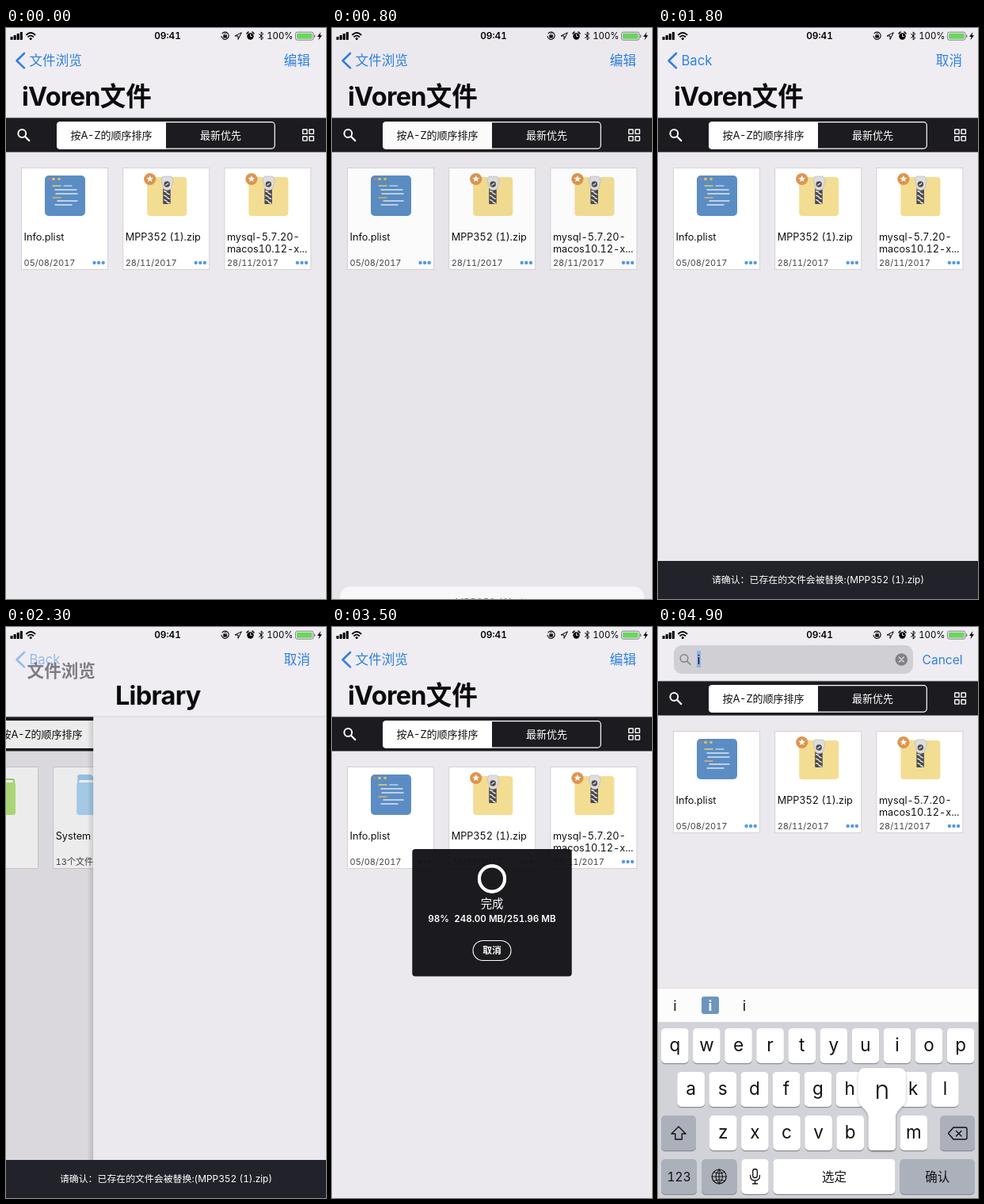
Write an HTML page that moves like this. It is 404x720 px and loops after 5000 ms.

```html
<!DOCTYPE html>
<html lang="zh">
<head>
<meta charset="utf-8">
<style>
html, body { margin: 0; width: 100%; height: 100%; overflow: hidden; background: #ebe9ee; }
svg { display: block; width: 404px; height: 720px; }
text { font-family: Inter, 'Noto Sans CJK SC', 'Noto Sans CJK', sans-serif; font-variant-numeric: tabular-nums; white-space: pre; }
</style>
</head>
<body>
<svg id="stage" viewBox="0 0 404 720"></svg>
<script>
const LOOP = 5000;
const INK = '#1c1b20', BLUE = '#2f80df', PAGE = '#ebe9ee', NAV = '#efedf2';
const $ = id => document.getElementById(id);

const rect = (x, y, w, h, fill, r = 0, more = '') =>
  `<rect x="${x}" y="${y}" width="${w}" height="${h}" rx="${r}" fill="${fill}" ${more}/>`;
const circle = (x, y, r, fill, more = '') => `<circle cx="${x}" cy="${y}" r="${r}" fill="${fill}" ${more}/>`;
const path = (d, fill, more = '') => `<path d="${d}" fill="${fill}" ${more}/>`;
const line = (d, color, width, more = '') =>
  path(d, 'none', `stroke="${color}" stroke-width="${width}" stroke-linecap="round" stroke-linejoin="round" ${more}`);
const text = (x, y, size, s, fill = '#111', more = '') =>
  `<text x="${x}" y="${y}" font-size="${size}" fill="${fill}" ${more}>${s}</text>`;
const MID = 'text-anchor="middle"', END = 'text-anchor="end"';
const group = (id, inner, more = '') => `<g id="${id}" ${more}>${inner}</g>`;

// Icons are drawn in a 51 by 51 box
function codeIcon() {
  const rows = [[10, 13, 20, '#e6cf6a'], [24, 13, 34, '#b9d3ee'], [13, 18, 40, '#dbe7f5'], [14, 23, 41, '#dbe7f5'],
    [10, 28, 20, '#e0b36c'], [16, 32, 41, '#dbe7f5'], [13, 37, 34, '#dbe7f5']];
  return rect(0, 0, 51, 51, '#5b8dc4', 5) +
    circle(5, 4.5, 1.5, '#d9775b') + circle(11, 4.5, 1.8, '#ecc84d') + circle(18, 4.5, 1.8, '#d5c65b') +
    rows.map(([x, y, x2, c]) => line(`M${x} ${y}H${x2}`, c, 1.5)).join('');
}

function zipIcon() {
  const star = Array.from({ length: 10 }, (_, i) => {
    const a = i * Math.PI / 5 - Math.PI / 2, r = i % 2 ? 2 : 4.6;
    return `${(4.5 + r * Math.cos(a)).toFixed(1)},${(4.3 + r * Math.sin(a)).toFixed(1)}`;
  });
  let teeth = '';
  for (let i = 0; i < 6; i++) teeth += line(`M${i % 2 ? 26 : 22.5} ${19.5 + i * 2.8}l3 1.5`, '#ebe9e2', 1.5);
  return rect(1, 2, 50, 49, '#f3dd92', 4) +
    rect(21, 16, 9.5, 20, '#4a4a4f', 1) + teeth +
    path('M21 1h10l3 5-3 11q-5 3-9 0l-3-11z', '#dddddf', 'stroke="#bcbabc" stroke-width=".7"') +
    circle(26, 11, 3.7, '#4c4c50') + line('M24.5 12l3-2', '#e8e8e8', 1.3) +
    circle(4.5, 4.5, 7.6, '#dc954f') + `<polygon points="${star.join(' ')}" fill="#fff"/>`;
}

function folderIcon(front, back, extra = '') {
  return path('M1 12V3q0-3 3-3h13q2 0 3 2l2 3h25q3 0 3 3v8H1z', back) +
    rect(3, 7, 45, 8, '#fff', 1) +
    path('M0 13q0-3 3-3h45q3 0 3 3v35q0 3-3 3H3q-3 0-3-3z', front) + extra;
}
const blueFolder = () => folderIcon('#b1d9f8', '#9fcdf0');
const greenFolder = () => folderIcon('#b7e67f', '#a3d86a',
  line('M20 21l2-4h8l2 4v18l-2 4h-8l-2-4zM21 21h10M21 39h10', '#79b144', 1.8) + path('M27 23l-5 8h3.5l-1 7 5-9h-3.5z', '#79b144'));

function card(i, icon, name, info, dots = true) {
  const x = 19.5 + 128.2 * (i % 3), y = 176.5 + 148.5 * Math.floor(i / 3);
  const lines = name.split('\n');
  return `<g transform="translate(${x} ${y})">` +
    rect(0, 0, 109, 128, '#fff', 0, 'stroke="#d3d2d8"') +
    `<g transform="translate(29.5 9.5)">${icon}</g>` +
    lines.map((s, k) => text(3, 91 + k * 15, 12.7, s)).join('') +
    text(3, 123, 11, info, '#444') +
    (dots ? [92, 97.6, 103.2].map(d => circle(d, 119.5, 2.2, '#559be6')).join('') : '') + '</g>';
}

const toolbar = rect(0, 113, 404, 43.5, INK) +
  circle(20.3, 133, 4.9, 'none', 'stroke="#fff" stroke-width="2"') + line('M24.2 137l5 5', '#fff', 2.4) +
  rect(64.7, 118.7, 274.6, 33.4, 'none', 4, 'stroke="#fff" stroke-width="1.2"') +
  path('M202 118.2H68q-4 0-4 4v26.5q0 4 4 4H202z', '#fff') +
  text(133, 140, 13, '按A-Z的顺序排序', '#111', MID) + text(271, 140, 13, '最新优先', '#fff', MID) +
  [[374.7, 128], [383, 128], [374.7, 136.7], [383, 136.7]].map(([x, y]) =>
    rect(x, y, 5.4, 5.4, 'none', .5, 'stroke="#fff" stroke-width="1.4"')).join('');

const page = (id, cards) => group(id, rect(0, 0, 404, 800, PAGE) + group(id + 'Body', toolbar + cards));
const APP = 'iVoren';

const pages =
  page('root', card(0, greenFolder(), APP + '文件', '3个文件', false) + card(1, blueFolder(), 'System', '13个文件', false)) +
  rect(0, 0, 404, 800, '#000', 0, 'id="rootDim"') +
  rect(-8, 113, 8, 607, 'url(#edge)', 0, 'id="shadow"') +
  page('files', card(0, codeIcon(), 'Info.plist', '05/08/2017') + card(1, zipIcon(), 'MPP352 (1).zip', '28/11/2017') +
    card(2, zipIcon(), 'mysql-5.7.20-\nmacos10.12-x...', '28/11/2017')) +
  page('lib', ['Caches,8', 'Cookies,0', 'Preferences,6', 'WebKit,1'].map((s, i) => {
    const [name, n] = s.split(',');
    return card(i, blueFolder(), name, n + '个文件');
  }).join(''));

const BOLD = 'font-weight="700" letter-spacing="-.7"';
const nav = rect(0, 0, 404, 113, NAV, 0, 'id="navBg"') + rect(0, 112.6, 404, .8, '#c9c8cd', 0, 'id="navLine"') +
  group('navItems',
    group('rootTitle', text(0, 0, 33, '文件浏览', '#22222a', 'font-weight="700"')) +
    group('filesTitle', text(0, 98, 32.5, `${APP}<tspan letter-spacing="0">文件</tspan>`, '#0b0b0e', BOLD)) +
    group('libTitle', text(0, 98, 32.5, 'Library', '#0b0b0e', BOLD)) +
    group('back', line('M23 32L13.5 41.2 23 50.4', BLUE, 2.6) + text(29.5, 47, 16.6, '', BLUE, 'id="backLabel"')) +
    text(384, 47, 16.6, '', BLUE, `id="action" ${END}`)) +
  group('search', rect(20, 23, 302, 36, '#d0cfd4', 10) +
    circle(33, 39.5, 4.8, 'none', 'stroke="#828187" stroke-width="1.4"') + line('M36.6 43l4.2 4.2', '#828187', 1.6) +
    group('query', rect(49, 30, 5, 21, '#8fb2e3') + text(49.5, 46.5, 16, 'i')) +
    circle(307.3, 41, 7.8, '#818086') + line('M304.3 38l6 6m0-6l-6 6', '#d9d8dd', 1.5) +
    text(333.5, 46.5, 15.6, 'Cancel', BLUE));

const status = [4, 6, 8, 10].map((h, i) => rect(5.5 + i * 4.1, 15 - h, 3.1, h, '#000', .7)).join('') +
  line('M25.8 8.5q5.4-5 10.8 0M28 11q3.2-2.8 6.4 0', '#000', 1.8) + circle(31.2, 13.4, 1.5, '#000') +
  text(204, 14.2, 11.8, '09:41', '#000', `${MID} font-weight="600"`) +
  line('M273 6.8a4.6 4.6 0 1 1-1 3.5', '#000', 1.1) + rect(274.3, 9, 4.6, 3.6, '#000', .5) +
  line('M275.3 9v-.8a1.3 1.3 0 0 1 2.6 0V9', '#000', .8) +
  line('M297 6l-8 4h4v4z', '#000', 1) +
  circle(308.5, 10.5, 4.2, '#000') + line('M308.5 8v2.6h2', '#fff', .9) +
  line('M304 7l2-2M313 7l-2-2', '#000', 1.6) +
  line('M319.5 7.5l5.4 5-2.7 2.5V5l2.7 2.5-5.4 5', '#000', 1) +
  text(362.5, 14.2, 11.4, '100%', '#000', END) +
  rect(365.5, 5.2, 22.5, 10, 'none', 2.2, 'stroke="#77757b" stroke-width=".9"') +
  rect(367, 6.7, 19.5, 7, '#6bd65f', 1) + rect(389, 8.5, 1.3, 3.5, '#77757b', .6) +
  path('M397.5 5l-4.5 6h2.7l-1.4 4.5 4.7-6.2h-2.7z', '#000');

const toast = rect(0, 672, 404, 48, '#22222a') + text(202, 700.4, 11.9, '', '#fff', `id="toastText" ${MID}`);

const sheetRows = ['打开', '复制', '移动', '删除'];
const sheet = rect(10, 0, 384, 284, '#f7f6f9', 13) + text(202, 25, 12.5, 'MPP352 (1).zip', '#8e8d93', MID) +
  sheetRows.map((s, i) => rect(10, 44 + i * 60, 384, .7, '#cfced4') +
    text(202, 81 + i * 60, 19.5, s, BLUE, MID)).join('') +
  rect(10, 292, 384, 58, '#fff', 13) + text(202, 328, 19.5, '取消', BLUE, `${MID} font-weight="600"`);
const SHEET_H = 360;

const dialog = rect(107, 280, 190, 160.5, '#131217', 4, 'id="dialogBox" opacity=".96"') +
  circle(202, 317.5, 17.3, 'none', 'stroke="#fff" stroke-width="1.7"') +
  circle(202, 317.5, 16, 'none', 'id="arc" stroke="#fff" stroke-width="4" pathLength="100" transform="rotate(-90 202 317.5)"') +
  text(202, 354, 14.3, '', '#fff', `id="total" ${MID}`) +
  text(202, 372, 11.6, '', '#fff', `id="amount" ${MID} font-weight="600"`) +
  rect(178, 395.5, 48, 25, 'none', 12.5, 'stroke="#fff" stroke-width="1.1"') +
  text(202, 412.3, 11.8, '取消', '#fff', `${MID} font-weight="600"`);

const PITCH = 40.1;
const rows = [['qwertyuiop', 4, 506], ['asdfghjkl', 24.3, 561], ['zxcvbnm', 65, 616]];
const key = (x, y, w, dark) => rect(x, y + 1.2, w, 44, '#8b8d93', 5) + rect(x, y, w, 44, dark ? '#abb0ba' : '#fff', 5);

function popup(id, x, y, letter) {
  const c = x + 17.3;
  return group(id, path(`M${c - 30} ${y - 51}q0-9 9-9h42q9 0 9 9v29q0 7-6 12-7 6-7 13v36q0 5-5 5h-24q-5 0-5-5v-36` +
    `q0-7-7-13-6-5-6-12z`, '#fff', 'filter="url(#soft)"') + text(c, y - 21, 32, letter, '#111', `${MID} font-weight="300"`));
}

const keyboard = rect(0, 455, 404, 44, '#fcfcfd') + rect(0, 455, 404, .7, '#d5d4d9') + rect(0, 498, 404, 222, '#d2d3d9') +
  group('hints', text(21.5, 484, 18, 'i', '#111', MID) + text(109, 484, 18, 'i', '#111', MID) +
    rect(55, 466, 22, 22, '#6c94bd', 3) + text(66, 484, 18, 'i', '#fff', `${MID} font-weight="700" font-family="Noto Serif, serif"`)) +
  rows.map(([letters, x0, y]) => [...letters].map((c, i) => key(x0 + i * PITCH, y, 34.6) +
    text(x0 + i * PITCH + 17.3, y + 29, 22.5, c, '#111', MID)).join('')).join('') +
  key(4, 616, 44, true) + line('M26 630l9 9h-4.8v7h-8.4v-7H17z', '#111', 1.4) +
  key(356, 616, 44, true) + line('M373 631h15q2 0 2 2v11q0 2-2 2h-15l-6.5-7.5zM376.5 635.5l6.5 6.5m0-6.5l-6.5 6.5', '#111', 1.4) +
  key(4, 671, 45, true) + text(26.5, 699, 15.5, '123', '#111', MID) +
  key(55, 671, 44.5, true) + circle(77.2, 693, 9, 'none', 'stroke="#111" stroke-width="1.2"') +
  line('M68.2 693h18M77.2 684v18M77.2 684q-9 9 0 18M77.2 684q9 9 0 18M70.5 687.5q6.7 3 13.4 0M70.5 698.5q6.7-3 13.4 0', '#111', 1) +
  key(105.3, 671, 34.3) + rect(119.7, 683.5, 5.6, 11, 'none', 2.8, 'stroke="#111" stroke-width="1.3"') +
  line('M116.5 691.5q0 6.5 6 6.5t6-6.5M122.5 698v4M119.5 702h6', '#111', 1.3) +
  key(145.5, 671, 154) + text(222.5, 699, 15.5, '选定', '#111', MID) +
  key(305.5, 671, 94.5, true) + text(352.7, 699, 15.5, '确认', '#111', MID) +
  popup('popI', 4 + 7 * PITCH, 506, 'i') + popup('popN', 65 + 5 * PITCH, 616, 'n');

$('stage').innerHTML = `<defs>
  <linearGradient id="edge"><stop offset="0" stop-color="#000" stop-opacity="0"/><stop offset="1" stop-color="#000" stop-opacity=".14"/></linearGradient>
  <filter id="soft" x="-20%" y="-20%" width="140%" height="140%"><feDropShadow dx="0" dy="1" stdDeviation="1.6" flood-opacity=".35"/></filter>
  </defs>` + pages + nav + status + group('toast', toast) + group('dialog', dialog) + group('keyboard', keyboard) +
  rect(0, 0, 404, 720, '#000', 0, 'id="dim"') + group('sheet', sheet);

const clamp = v => Math.max(0, Math.min(1, v));
const ramp = (t, a, b) => { const u = clamp((t - a) / (b - a)); return u * u * (3 - 2 * u); };
const during = (t, a, b) => t >= a && t < b;
const set = (id, name, value) => $(id).setAttribute(name, value);
const show = (id, on) => set(id, 'display', on ? 'inline' : 'none');
const move = (id, x, y, scale = 1) => set(id, 'transform', `translate(${x} ${y}) scale(${scale})`);
const fade = (id, v) => set(id, 'opacity', v);

const PASTE_ON = 1280, COPY_ON = 2580, COPY_DONE = 3290;

// Which page lies over the root, how far in it is, and whether it has its content
function route(t) {
  if (t < 2100) return { top: 'files', p: 1 - ramp(t, 1830, 2050), ready: true };
  if (t < COPY_DONE) return { top: 'lib', p: ramp(t, 2150, 2380), ready: t > 2350 };
  if (t < 4150) return { top: 'files', p: 1 - ramp(t, 3840, 4060), ready: true };
  return { top: 'files', p: ramp(t, 4232, 4482), ready: t > 4440 };
}

function drawPages(t) {
  const { top, p, ready } = route(t);
  const find = ramp(t, 4540, 4690), lift = -45 * find;
  const paste = during(t, PASTE_ON, COPY_DONE);
  move('root', -121 * p, 0);
  fade('rootDim', .1 * p);
  move('shadow', 404 * (1 - p), 0);
  for (const id of ['files', 'lib']) {
    show(id, id === top);
    show(id + 'Title', id === top);
    show(id + 'Body', ready);
    move(id, 404 * (1 - p), lift);
    move(id + 'Title', 20 + 432 * (1 - p), 0);
    fade(id + 'Title', clamp(p * 1.6));
  }
  const q = Math.pow(p, 1.15), late = clamp(p * 2 - 1);
  move('rootTitle', 20 + 9.5 * q, 98 - 51 * q, 1 - .5 * q);
  fade('rootTitle', 1 - late);
  fade('back', late);
  $('backLabel').textContent = paste ? 'Back' : '文件浏览';
  $('action').textContent = paste ? '取消' : '编辑';
  set('navBg', 'height', 113 + lift);
  move('navLine', 0, lift);
  fade('navItems', 1 - find);
  fade('search', find);
}

function drawCopy(t) {
  show('toast', during(t, PASTE_ON, COPY_DONE));
  move('toast', 0, 48 * (1 - ramp(t, PASTE_ON, PASTE_ON + 120)));
  $('toastText').textContent = t < 2350 ? '请确认：已存在的文件会被替换:(MPP352 (1).zip)' : '【复制到(Library)目录】';

  show('dialog', during(t, COPY_ON, 3760));
  fade('dialog', ramp(t, COPY_ON, COPY_ON + 60) * (1 - ramp(t, 3660, 3760)));
  const done = t >= COPY_DONE;
  const mb = 8 * Math.round(31 * clamp((t - COPY_ON) / (COPY_DONE - COPY_ON)));
  const percent = Math.round(mb / 251.96 * 100);
  $('total').textContent = done ? '完成' : `total:${percent + 1}%  0/1`;
  $('amount').textContent = `${percent}%  ${mb.toFixed(2)} MB/251.96 MB`;
  set('arc', 'stroke-dasharray', done ? '100 0' : `${percent + 1} 100`);
  const w = $('amount').getComputedTextLength() + 40;
  set('dialogBox', 'x', 202 - w / 2);
  set('dialogBox', 'width', w);
}

function drawOverlays(t) {
  const up = ramp(t, 110, 360) * (1 - ramp(t, 600, 830));
  fade('dim', .4 * up);
  move('sheet', 0, 720 - SHEET_H * up);
  show('sheet', up > 0);

  move('keyboard', 0, 265 * (1 - ramp(t, 4560, 4730)));
  show('keyboard', t > 4560);
  show('popI', during(t, 4770, 4860));
  show('popN', t >= 4880);
  show('query', t >= 4790);
  show('hints', t >= 4790);
}

function draw(t) {
  drawPages(t);
  drawCopy(t);
  drawOverlays(t);
}

const start = performance.now();
function tick() {
  draw((performance.now() - start) % LOOP);
  requestAnimationFrame(tick);
}
tick();
</script>
</body>
</html>
```
